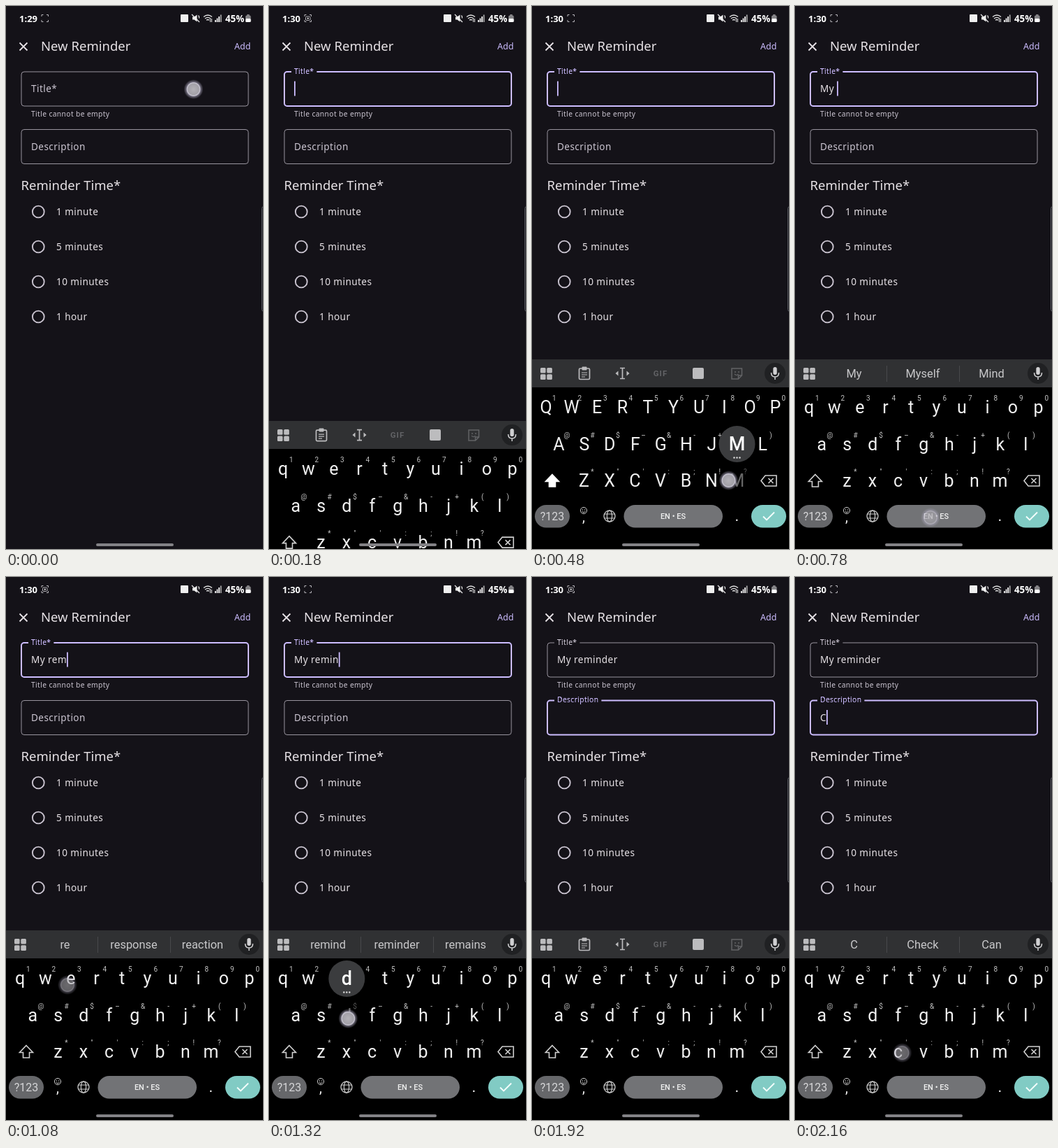
An HTML page with a canvas for the animation above (2220 ms loop, 368 px wide and 776 px high).

```html
<!DOCTYPE html>
<html lang="en">
<head>
<meta charset="utf-8">
<title>New Reminder</title>
<style>
html, body { margin: 0; width: 100%; height: 100%; overflow: hidden; background: #141218; }
canvas { display: block; }
</style>
</head>
<body>
<canvas id="stage" width="368" height="776"></canvas>
<script>
const g = document.getElementById('stage').getContext('2d');
const LOOP = 2220, STEP = 60;
const BG = '#141218', INK = '#e6e1e5', SOFT = '#cac4d0', ACCENT = '#cdbdff', KEY = '#f1f1f1', ICON = '#bcbcbe', DIM = '#626366';
const APP = '"Noto Sans", sans-serif', KB = 'Roboto, sans-serif';

const ROWS = [
  ['qwertyuiop', 20, 573, '1234567890'],
  ['asdfghjkl', 38.3, 626, '@#$–&-+()'],
  ['zxcvbnm', 74.5, 678, '*"\':;!?']
];
const PITCH = 36.5;

// start, key, finger offset x and y, time the finger mark stays
const TAPS = [
  [480, 'M', -12, 0, 120], [600, 'y', 3, 6, 120], [720, ' ', -8, 2, 120],
  [840, 'r', 2, 8, 120], [960, 'e', -5, 10, 180], [1020, 'm', -6, 3, 60],
  [1140, 'i', -4, 8, 60], [1200, 'n', -4, 4, 120], [1320, 'd', 2, 5, 60],
  [1380, 'e', -4, 9, 60], [1440, 'r', 2, 8, 120], [2040, 'C', 6, 2, 180]
];
const TITLE_FOCUS = 60, DESC_FOCUS = 1740;

const HINTS = {
  'M': ['M', 'My', 'Me'], 'My': ['My', 'Myself', 'Mind'], 'My ': ['name', 'phone', 'friend'],
  'My r': ['r', 'room', 'right'], 'My re': ['re', 'response', 'reaction'],
  'My rem': ['rem', 'remote', 'remember'], 'My remi': ['remi', 'remind', 'reminder'],
  'My remin': ['remind', 'reminder', 'remains'], 'My remind': ['remind', 'reminder', 'reminds'],
  'My reminde': ['reminder', 'reminded', 'reminders'], 'My reminder': ['reminder', 'reminders', null],
  'C': ['C', 'Check', 'Can']
};

const clamp = v => Math.max(0, Math.min(1, v));
const mix = (a, b, p) => a + (b - a) * p;

function text(s, x, y, size, color, { font = APP, weight = 400, gap = 0, align = 'left' } = {}) {
  g.font = `${weight} ${size}px ${font}`;
  g.letterSpacing = gap + 'px';
  g.textAlign = align;
  g.fillStyle = color;
  g.fillText(s, x, y);
  return g.measureText(s).width;
}
const keyText = (s, x, y, size, color, weight) =>
  text(s, x, y, size, color, { font: KB, align: 'center', weight });

function paint(fill, stroke, w = 1) {
  if (fill) { g.fillStyle = fill; g.fill(); }
  if (stroke) { g.strokeStyle = stroke; g.lineWidth = w; g.stroke(); }
}
function box(x, y, w, h, r, fill, stroke, lw) {
  g.beginPath(); g.roundRect(x, y, w, h, r); paint(fill, stroke, lw);
}
function disc(x, y, r, fill, stroke, lw) {
  g.beginPath(); g.arc(x, y, r, 0, 7); paint(fill, stroke, lw);
}
function path(d, fill, stroke, lw) {
  const p = new Path2D(d);
  if (fill) { g.fillStyle = fill; g.fill(p); }
  if (stroke) { g.strokeStyle = stroke; g.lineWidth = lw; g.stroke(p); }
}

function statusBar(t) {
  const bold = { weight: 600 };
  text(t < TITLE_FOCUS ? '1:29' : '1:30', 19, 22.5, 13, '#fff', bold);
  path('M51 15v-2.5h2.5M58 12.5h2.5v2.5M60.5 20v2.5h-2.5M53.5 22.5h-2.5v-2.5', null, '#b5b3b8', 1);
  const phase = t % 840;
  if (phase >= 60 && phase < 480) {
    box(52.5, 15, 6.5, 5.5, 1.5, null, '#b5b3b8', 1);
    disc(55.8, 17.8, 1.2, '#d0d0d0');
  }
  box(250, 12, 11, 11, 1, '#f0f0f0');
  path('M267 15.5h2.5l4-3v10l-4-3h-2.5z', '#f0f0f0');
  path('M266 12l11 11M275.500 13.500q1.500 1.500 1 4', null, '#f0f0f0', 1.2);
  path('M283 15.500q6-5 12 0M285 18q4-3.300 8 0M287 20.300q2-1.500 4 0', null, '#e4e4e4', 1.4);
  path('M292.500 18v5M294.500 18v5', null, '#e4e4e4', 1);
  for (let i = 0; i < 4; i++) box(299 + i * 2.6, 20 - i * 2.5, 1.8, 3 + i * 2.5, 0, i < 3 ? '#f0f0f0' : '#aaa');
  text('45%', 314, 22.5, 13.3, '#fff', bold);
  box(345, 12, 3.5, 2, 0.5, '#858487');
  box(343, 13.5, 7.5, 9.5, 1.5, '#858487');
  box(343, 18, 7.5, 5, 1.5, '#fff');
}

function field(y, label, value, lift, focus, cursor) {
  const color = focus ? ACCENT : SOFT, size = mix(13.6, 10.3, lift);
  box(22, y + 0.5, 325, 49, 4, null, focus ? ACCENT : '#98949e', focus ? 2 : 1);
  const style = { gap: mix(0.42, 0.36, lift) };
  if (lift > 0.5) {
    const w = text(label, 36, y + 3, size, color, style);
    g.fillStyle = BG;
    g.fillRect(32, y - 2, w + 8, 5);
  }
  text(label, 36, mix(y + 29.5, y + 3, lift), size, color, style);
  if (lift < 1) return;
  const w = value ? text(value, 36, y + 29.5, 13.6, INK, { gap: 0.42 }) : 0;
  if (cursor) { g.fillStyle = ACCENT; g.fillRect(36 + w, y + 14, 1.8, 21); }
}

function form(t, title, desc) {
  path('M19.500 52.500l11 11M30.500 52.500l-11 11', null, INK, 1.8);
  text('New Reminder', 50, 64.3, 18.5, INK);
  text('Add', 327, 62, 12.4, ACCENT, { weight: 500, gap: 0.1 });
  const onTitle = t >= TITLE_FOCUS && t < DESC_FOCUS, onDesc = t >= DESC_FOCUS;
  field(93.5, 'Title*', title, clamp((t - 30) / 120), onTitle, onTitle);
  text('Title cannot be empty', 36, 158, 10.3, SOFT, { gap: 0.36 });
  field(176, 'Description', desc, clamp((t - DESC_FOCUS + 30) / 120), onDesc, t < 1860 || t >= 1980);
  text('Reminder Time*', 21.5, 262.5, 18.5, INK);
  ['1 minute', '5 minutes', '10 minutes', '1 hour'].forEach((s, i) => {
    disc(46.3, 294 + i * 50, 8.4, null, SOFT, 1.9);
    text(s, 72, 298.7 + i * 50, 13.6, INK, { gap: 0.42 });
  });
  box(366.5, 286.5, 12, 150, 3, null, '#62656b', 1);
}

function toolIcons() {
  box(67.500, 518, 15, 15.500, 1.500, null, ICON, 1.7);
  box(71.500, 515.500, 7, 5, 1, ICON);
  path('M71 524h8M71 527h8M71 530h5', null, ICON, 1.2);
  path('M126 517.500h7M126 532.500h7M129.500 517.500v15', null, ICON, 1.7);
  path('M123.500 521.500v7l-4-3.500zM135.500 521.500v7l4-3.500z', ICON);
  text('GIF', 184, 529, 11.5, DIM, { font: KB, weight: 700, gap: 1, align: 'center' });
  box(230, 517, 16, 16, 2, ICON);
  path('M286 518h14.500v10l-5 5h-9.500zM295.500 533v-5h5', null, DIM, 1.5);
  disc(291, 523, 1, DIM); disc(296, 523, 1, DIM);
  path('M290 526q3 3 5.500 0', null, DIM, 1.2);
}

function ribbon() {
  g.lineJoin = 'round';
  path('M277.500 532L286 521.500q2-4-3-4t-3 4L288.500 532', null, '#d9a91c', 4.2);
  path('M277.500 532L286 521.500q2-4-3-4t-3 4L288.500 532', null, '#fbd22f', 3);
  g.lineJoin = 'miter';
}

function toolbar(words) {
  box(0, 505, 368, 40, 0, '#303133');
  for (const x of [12, 21.3]) for (const y of [517, 526.3]) box(x, y, 7.6, 7.6, 1.5, ICON);
  if (!words) toolIcons();
  else {
    box(131, 514, 1, 23, 0, '#48494c');
    box(235, 514, 1, 23, 0, '#48494c');
    words.forEach((s, i) => s ? keyText(s, [84.5, 183, 281.5][i], 531, 16.4, '#c8c8ca') : ribbon());
  }
  disc(348, 525, 15, '#202123');
  box(345.3, 516, 5.4, 11, 2.7, '#d0d0d2');
  path('M342.500 524q0 6 5.500 6t5.500-6M348 530v4', null, '#d0d0d2', 1.5);
}

function keyAt(ch) {
  if (ch === ' ') return [202, 729];
  for (const [keys, x, y] of ROWS) {
    const i = keys.indexOf(ch.toLowerCase());
    if (i >= 0) return [x + i * PITCH, y];
  }
}

function keyboard(t, words, pressed) {
  const caps = (t >= 300 && t < 540) || (t >= 1980 && t < 2100);
  box(0, 505, 368, 271, 0, '#000');
  toolbar(words);
  for (const [keys, x0, y, marks] of ROWS) [...keys].forEach((k, i) => {
    const x = x0 + i * PITCH, held = pressed && pressed.toLowerCase() === k;
    keyText(caps ? k.toUpperCase() : k, x, y + 8.5, 25, held ? '#666' : KEY);
    keyText(marks[i], x + 11.8, y - 9.5, 10, held ? '#555' : '#c4c4c4');
  });
  path('M29 669.500L38.500 679.500h-5v7.500h-9v-7.500h-5z', caps ? '#fff' : null, caps ? '#fff' : '#d0d0d0', 1.6);
  path('M334 671h16v15h-16l-6-7.500zM338.500 675l7 7M345.500 675l-7 7', null, '#d0d0d0', 1.6);

  box(4, 713, 50, 32.5, 16.2, '#66676a');
  keyText('?123', 29, 735, 16, '#d6d6d8');
  disc(74, 721, 4.6, null, '#ccc', 1);
  disc(72.3, 720, 0.7, '#ccc'); disc(75.7, 720, 0.7, '#ccc');
  path('M71.500 722.500q2.500 2.500 5 0', null, '#ccc', 1);
  keyText(',', 74, 737, 20, KEY);
  disc(111, 729, 8, null, '#ccc', 1.3);
  g.beginPath(); g.ellipse(111, 729, 3.6, 8, 0, 0, 7); paint(null, '#ccc', 1.2);
  path('M103.500 726h15M103.500 732h15', null, '#ccc', 1.2);
  box(131.500, 713, 141.500, 32.5, 16.2, '#727376');
  keyText('EN • ES', 202, 733, 11, '#efefef', 500);
  keyText('.', 293.500, 736, 22, KEY);
  box(314, 713, 50, 32.5, 16.2, '#81cbc4');
  path('M331 729.500l5 5 11-11', null, '#f4fffd', 1.9);

  if (pressed && pressed !== ' ') {
    const [x, y] = keyAt(pressed);
    disc(x, y - 52, 26, '#3b3c3e');
    keyText(pressed, x, y - 43, 27, '#fff', 500);
    for (const d of [-4, 0, 4]) disc(x + d, y - 32.5, 1.2, '#ddd');
  }
}

function finger(x, y, alpha) {
  const glow = g.createRadialGradient(x, y, 0, x, y, 14);
  [[0, '#b3b1b7'], [0.55, '#a3a1a8'], [0.67, '#c9c6d2'], [0.74, '#b9b4cc88'], [1, '#b9b4cc00']]
    .forEach(s => glow.addColorStop(...s));
  g.globalAlpha = alpha;
  disc(x, y, 14, glow);
  g.globalAlpha = 1;
}

const typed = (from, to) =>
  TAPS.filter(([s]) => s >= from && s + STEP <= to).map(tap => tap[1]).join('');

function draw(t) {
  g.fillStyle = BG;
  g.fillRect(0, 0, 368, 776);
  const title = typed(0, Math.min(t, DESC_FOCUS)), desc = typed(DESC_FOCUS, t);
  statusBar(t);
  form(t, title, desc);

  const rise = clamp((t - 60) / 300);
  if (rise > 0) {
    const held = TAPS.find(([s]) => t >= s && t < s + STEP);
    const late = t - STEP;
    const words = HINTS[t < DESC_FOCUS ? typed(0, late) : typed(DESC_FOCUS, late)];
    g.save();
    g.translate(0, 271 * (1 - rise) ** 2.2);
    keyboard(t, words, held && held[1]);
    g.restore();
  }
  box(129, 768, 111, 4, 2, '#838286');

  const marks = TAPS.map(([s, ch, dx, dy, ms]) => {
    const [x, y] = keyAt(ch);
    return [s, x + dx, y + dy, ms];
  });
  marks.push([0, 268.5, 119, 120], [1620, 232, 201, 180]);
  for (const [s, x, y, ms] of marks) {
    const age = (t - s) / ms;
    if (age >= 0 && age < 1) finger(x, y, 1 - 0.6 * age);
  }
}

function tick() {
  draw(Math.floor((performance.now() % LOOP) / STEP) * STEP);
  requestAnimationFrame(tick);
}
tick();
</script>
</body>
</html>
```
